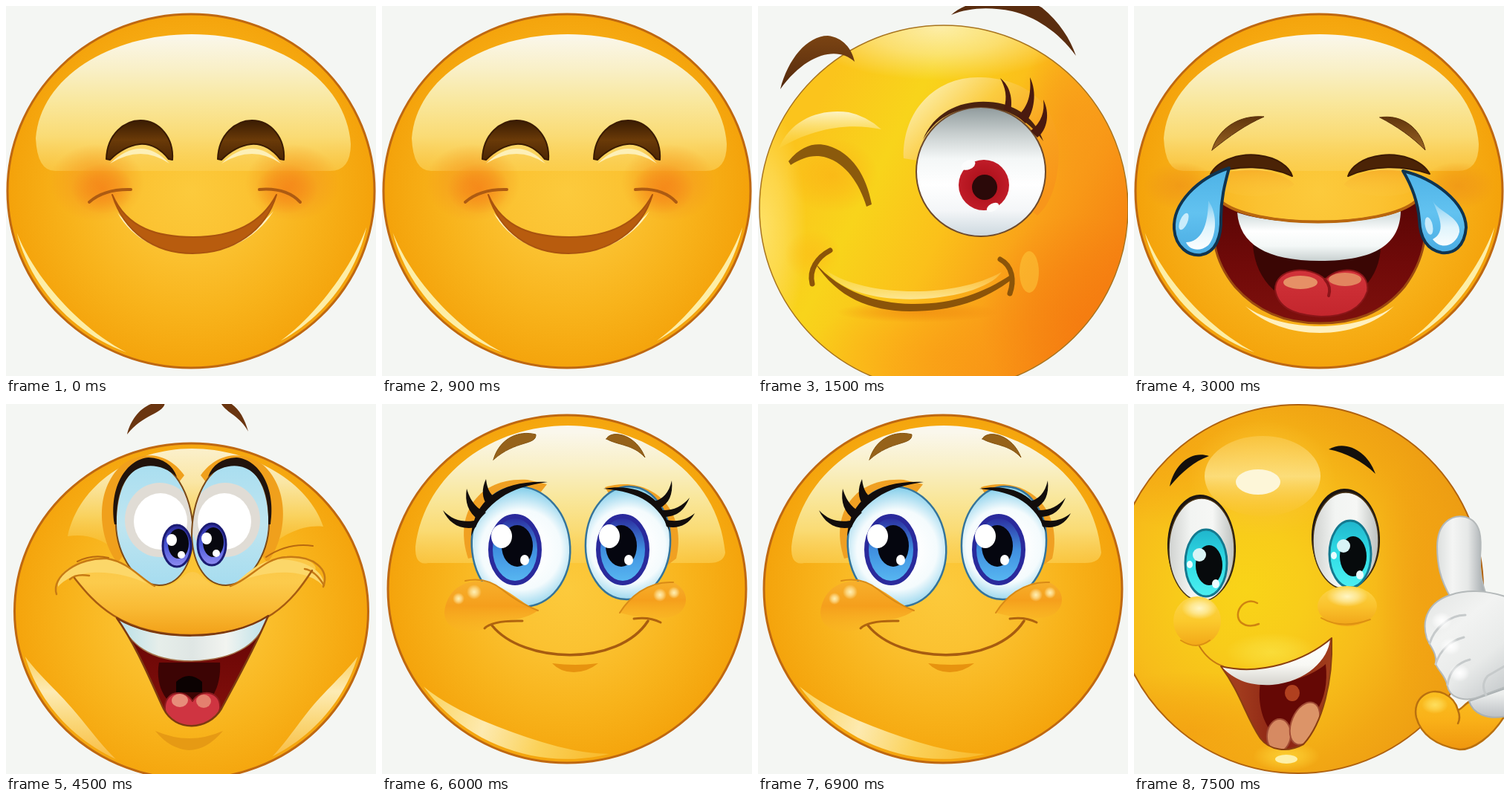
Animation, 498 px wide and 498 px high, one loop 9000 ms. Source, as an HTML page with a canvas:

```html
<!DOCTYPE html>
<html lang="en">
<head>
<meta charset="utf-8">
<title>Six smileys</title>
<style>
html, body { margin: 0; width: 100%; height: 100%; overflow: hidden; background: #f4f6f3; }
canvas { display: block; width: 498px; height: 498px; }
</style>
</head>
<body>
<canvas id="stage" width="498" height="498"></canvas>
<script>
const ctx = document.getElementById('stage').getContext('2d');
const HOLD = 1500;

function ramp(g, colors) {
  colors.forEach((c, i) => g.addColorStop(i / (colors.length - 1), c));
  return g;
}
const lin = (x0, y0, x1, y1, ...colors) => ramp(ctx.createLinearGradient(x0, y0, x1, y1), colors);
const rad = (x, y, r, ...colors) => ramp(ctx.createRadialGradient(x, y, 0, x, y, r), colors);

function paint(path, fill, line, width = 2) {
  if (fill) { ctx.fillStyle = fill; ctx.fill(path); }
  if (line) { ctx.strokeStyle = line; ctx.lineWidth = width; ctx.stroke(path); }
}
const shape = (d, fill, line, width) => paint(new Path2D(d), fill, line, width);
const stroke = (d, color, width) => shape(d, null, color, width);

function ovalPath(x, y, rx, ry, turn = 0) {
  const p = new Path2D();
  p.ellipse(x, y, rx, ry, turn, 0, Math.PI * 2);
  return p;
}
const oval = (x, y, rx, ry, fill, line, width, turn) => paint(ovalPath(x, y, rx, ry, turn), fill, line, width);

// Elliptical glow; rgb is "r,g,b"
function glow(x, y, rx, ry, rgb, alpha = 1) {
  ctx.save();
  ctx.translate(x, y);
  ctx.scale(rx, ry);
  oval(0, 0, 1, 1, rad(0, 0, 1, `rgba(${rgb},${alpha})`, `rgba(${rgb},${alpha * 0.6})`, `rgba(${rgb},0)`));
  ctx.restore();
}

function within(path, draw) {
  ctx.save();
  ctx.clip(path);
  draw();
  ctx.restore();
}

function mirrored(axis, draw) {
  draw();
  ctx.save();
  ctx.translate(2 * axis, 0);
  ctx.scale(-1, 1);
  draw();
  ctx.restore();
}

function ball(x, y, rx, ry) {
  oval(x, y, rx, ry, rad(x, y, 248, '#fcca3c', '#fbc231', '#f8b31b', '#f4a20a'), '#bf6811', 3);
}

// Crescent just inside the rim of a ball, between two angles in degrees
function rimLight(x, y, rx, ry, from, to, depth, fill) {
  const p = new Path2D();
  const steps = 24;
  for (let i = 0; i <= 2 * steps; i++) {
    const u = i <= steps ? i / steps : 2 - i / steps;
    const a = (from + (to - from) * u) * Math.PI / 180;
    const r = 0.978 - (i > steps ? depth * Math.sin(Math.PI * u) : 0);
    p.lineTo(x + rx * r * Math.cos(a), y + ry * r * Math.sin(a));
  }
  p.closePath();
  paint(p, fill);
}

const glossFill = bottom => lin(0, 38, 0, bottom, '#faf7ec', '#f9f0c8', '#f9e79c', '#fadb74', 'rgba(251,208,84,.65)');

function glossyBall() {
  ball(249, 249, 247, 238);
  shape('M40 178C46 96 140 38 250 38C362 38 458 98 464 186Q464 222 436 222H66Q42 222 40 178Z', glossFill(222));
  rimLight(249, 249, 247, 238, 166, 111, 0.036, '#fdeea6');
  rimLight(249, 249, 247, 238, 12, 60, 0.032, '#fdeea6');
}

function beaming() {
  glossyBall();
  mirrored(254, () => {
    glow(122, 238, 64, 52, '245,150,30', 0.8);
    glow(130, 246, 42, 34, '245,125,22', 0.65);
  });
  for (const dx of [0, 150]) {
    ctx.save();
    ctx.translate(dx, 0);
    shape('M140 212Q182 172 220 212Q182 186 140 212Z', '#fdf0b8');
    shape('M135 206C136 172 160 154 181 154C207 154 226 178 224 207L219 206C206 190 192 185 180 186C163 188 151 196 140 207Z',
      lin(0, 154, 0, 207, '#3a1c02', '#6a3a08', '#4c2604'), '#3a1b02', 2);
    ctx.restore();
  }
  shape('M150 278C190 352 314 352 360 276C318 328 190 330 150 278Z', '#fff2bf');
  shape('M143 254C163 300 205 311 252 311C302 311 342 296 364 254C350 302 306 333 251 333C200 333 159 305 143 254Z', '#b85c0e', '#a9530e', 2);
  stroke('M112 264Q132 246 168 247M341 247Q377 244 396 264', '#ad5b12', 4);
}

function winking() {
  const body = ovalPath(250, 272, 248, 246);
  paint(body, lin(50, 190, 455, 400, '#fbc41c', '#f8d41b', '#fbc01a', '#f99e18', '#f58312'));
  within(body, () => {
    glow(245, 30, 190, 70, '253,240,180', 0.9);
    glow(5, 300, 60, 170, '255,232,120', 0.8);
    glow(250, 470, 180, 90, '250,150,20', 0.5);
    glow(430, 420, 130, 140, '245,118,14', 0.5);
    glow(420, 150, 70, 110, '247,150,25', 0.6);
  });
  paint(body, null, '#a8741f', 1.5);

  // closed eye
  shape('M28 192C44 152 84 138 122 143Q146 148 166 166C120 156 70 166 28 192Z', lin(0, 140, 0, 190, '#fdf6cf', 'rgba(252,215,70,.3)'));
  glow(100, 228, 62, 50, '251,176,20', 0.65);
  shape('M41 209C60 186 78 184 94 188C126 197 146 228 153 267L146 270C136 238 118 212 92 204C75 199 60 204 44 214Z', '#8b5a0c');

  // open eye
  shape('M196 205C194 140 240 94 300 96C370 98 412 142 404 215C400 250 390 270 376 282L300 222Z',
    lin(240, 90, 390, 250, '#fdf0ae', '#fbcc40', '#f9a51e', '#f8961a'));
  oval(300, 223, 87, 87, lin(0, 136, 0, 310, '#8f9a9c', '#c6cdcd', '#f4f7f7', '#ffffff', '#f4f6f8', '#ccd8df'), '#6e4a2c', 2);
  shape('M222 180C240 134 290 122 330 132C358 140 376 158 384 182C362 150 330 136 300 136C264 137 238 152 222 180Z', '#4a220f');
  shape('M331 139C336 122 333 110 326 97C340 108 343 126 340 142Z', '#4a1a0f');
  shape('M349 148C364 136 368 118 366 96C376 116 372 142 360 158Z', '#4a1a0f');
  shape('M367 168C382 156 386 142 384 126C393 144 390 166 376 177Z', '#4a1a0f');
  oval(304, 241, 34, 34, rad(304, 241, 34, '#8f0f18', '#b3141f', '#c01c28'));
  oval(283, 214, 10, 6, '#fbfcfc', null, 0, -0.4);
  oval(316, 271, 9, 5, '#fbfcfc', null, 0, -0.5);
  oval(305, 244, 17, 17, '#2b0909');

  // eyebrows
  shape('M30 112C40 72 66 40 94 40C114 42 127 58 130 75C108 54 66 62 30 112Z', lin(0, 40, 0, 112, '#7b4413', '#53290d'));
  shape('M260 12C288 -14 352 -14 382 2C406 22 420 44 428 67C404 34 372 14 342 7C312 1 284 2 260 12Z', '#5a2d0f');

  // mouth
  glow(74, 335, 38, 34, '252,190,24', 0.7);
  oval(365, 358, 13, 28, 'rgba(253,200,60,.55)');
  shape('M92 356C140 390 260 396 328 358C300 400 130 414 92 356Z', lin(0, 352, 0, 404, 'rgba(253,224,110,.2)', '#fdf0b2'));
  glow(215, 412, 110, 14, '238,130,14', 0.6);
  shape('M76 345C112 386 160 400 206 401C262 402 304 386 340 362L343 367C306 396 262 411 204 411C150 410 108 394 76 345Z', '#8b5409');
  stroke('M73 374C68 355 80 338 97 329M326 341C343 350 345 370 339 387', '#8b5409', 7);
}

function laughing() {
  glossyBall();
  mirrored(249, () => {
    glow(62, 242, 50, 32, '240,150,22', 0.8);
    shape('M100 236C130 216 190 214 216 240C190 262 130 262 100 236Z', lin(0, 218, 0, 260, 'rgba(246,166,36,.7)', 'rgba(252,205,70,.1)'));
  });
  shape('M105 194C112 168 138 146 175 149C150 160 130 174 105 194Z', lin(0, 148, 0, 194, '#5f340c', '#9a6424'), '#5a310c', 1);
  shape('M331 150C360 145 386 164 392 194C374 176 354 162 331 150Z', lin(0, 148, 0, 194, '#5f340c', '#9a6424'), '#5a310c', 1);
  mirrored(250.5, () => shape('M103 226C114 206 144 198 168 201C193 204 209 216 213 229C180 214 140 214 103 226Z', '#4b2306', '#3c1a04', 2));

  shape('M150 404C200 440 300 440 350 404C300 452 200 452 150 404Z', '#fff0bd');
  const mouth = new Path2D('M116 262C158 300 338 300 380 262C404 296 388 346 364 378C334 414 296 427 250 427C204 427 166 412 136 378C108 344 98 300 116 262Z');
  paint(mouth, lin(0, 270, 0, 425, '#5c0605', '#700a09', '#7d100d'));
  within(mouth, () => {
    shape('M160 322H332C332 366 300 400 250 406C198 402 164 372 160 322Z', '#3a0604');
    shape('M190 382C190 352 236 348 257 368C280 346 318 354 314 384C306 408 284 418 252 418C218 416 194 408 190 382Z',
      lin(0, 355, 0, 418, '#d2333a', '#c3262d'), '#8a1518', 2);
    stroke('M257 368Q266 378 262 390', '#8c1419', 4);
    oval(224, 372, 23, 9, '#e69066');
    oval(284, 368, 22, 9, '#e2855f');
    shape('M139 278C190 296 310 296 359 276C358 320 326 343 250 343C178 343 142 320 139 278Z',
      lin(0, 283, 0, 343, '#d6e0e0', '#ffffff', '#f4f8f7', '#c8d0d0'));
  });
  paint(mouth, null, '#9c4a10', 3);
  stroke('M116 262C158 300 338 300 380 262', '#b8660f', 4);

  const blue = lin(0, 220, 0, 336, '#4db2e6', '#62c2f0', '#49abe2');
  shape('M128 218C85 232 52 266 54 300C56 325 74 337 90 335C110 332 118 310 117 285C117 260 122 240 128 218Z', blue, '#0f3450', 4);
  shape('M362 222C404 232 446 264 447 298C445 324 430 334 414 332C394 328 385 312 384 288C382 262 374 242 362 222Z', blue, '#0f3450', 4);
  const shine = lin(0, 265, 0, 330, 'rgba(255,255,255,.2)', '#dff4fc', '#ffffff');
  shape('M100 262C112 278 112 308 100 322C88 332 74 328 70 318C90 318 100 296 100 262Z', shine);
  shape('M402 262C408 276 440 284 438 304C434 322 414 330 402 314C420 304 412 286 402 262Z', shine);
  oval(67, 290, 5, 12, '#c9ecfb', null, 0, 0.4);
  oval(397, 296, 5, 12, '#c9ecfb', null, 0, -0.2);
}

function thrilled() {
  shape('M163 41C168 18 188 -6 214 -2C212 14 186 12 163 41Z', '#6a3510');
  shape('M326 37C320 14 306 -6 288 -4C294 12 314 14 326 37Z', '#6a3510');
  ball(249.5, 279, 238, 226);
  shape('M83 178C98 108 170 60 250 60C332 60 408 106 427 165C400 162 370 176 352 196L146 196C130 182 108 174 83 178Z',
    lin(0, 60, 0, 196, '#fbf0cc', '#fae6a4', '#f9d25e', 'rgba(249,190,50,.6)'));
  const light = lin(0, 345, 0, 470, '#fad46a', '#fdebb4', '#fad778', '#f9c04a');
  rimLight(249.5, 279, 238, 226, 164, 116, 0.09, light);
  rimLight(249.5, 279, 238, 226, 16, 62, 0.09, light);

  mirrored(251, () => {
    shape('M150 214C124 180 118 116 156 82C180 64 216 62 240 96L190 160Z', '#f0a01c');
    const eye = new Path2D('M148 152C150 110 166 82 194 80C232 80 252 132 252 178C250 218 232 244 206 244C170 242 146 196 148 152Z');
    paint(eye, lin(0, 80, 0, 244, '#a9def0', '#bfe5f0', '#a6dcef'));
    within(eye, () => {
      oval(207, 156, 47, 50, '#e0dcd5');
      oval(208, 158, 36, 38, '#ffffff');
    });
    paint(eye, null, '#7c4a18', 2);
    shape('M146 162C138 112 162 74 192 72C212 73 224 82 230 98C210 80 184 78 168 94C152 110 148 136 149 162Z', '#21130c');
  });
  for (const [x, y] of [[230, 191], [277, 189]]) {
    oval(x, y, 19, 28, lin(0, y - 28, 0, y + 28, '#2a2896', '#4a58d8', '#8f8cf2'), '#1c1c74', 3);
    oval(x + 2, y - 3, 14, 20, '#07070f');
    oval(x - 7, y - 8, 7, 8, '#ffffff');
    oval(x + 6, y + 12, 5, 5, '#ffffff');
  }

  // cheeks and upper lip
  shape('M92 234C78 228 84 210 136 207C166 212 182 236 200 245C230 252 236 226 251 226C266 226 272 252 302 245C330 236 346 206 378 205C418 206 424 226 410 226C386 264 350 312 250 311C152 311 112 262 92 234Z',
    lin(0, 204, 0, 311, '#fbc644', '#fccb4c', '#f9ba34', '#f2a018'));
  mirrored(249, () => shape('M70 246C68 224 98 208 136 209C160 213 176 230 190 242C160 226 96 216 70 246Z', '#fcd769'));
  stroke('M68 256C60 232 98 206 136 208C166 213 182 236 200 245M302 245C330 236 346 207 378 206C414 204 436 222 427 246', '#c77a14', 2.5);
  stroke('M96 212Q116 202 138 207M350 206Q380 186 413 191', '#b8690f', 2);
  stroke('M86 236Q94 228 112 231M402 222Q416 224 428 244', '#c77a14', 2.5);
  stroke('M92 234C116 264 152 311 250 311C350 311 386 264 412 224', '#a85c10', 2.5);

  const mouth = new Path2D('M149 288C200 320 300 320 353 285C332 334 306 380 290 410C272 440 228 442 212 410C196 376 176 326 149 288Z');
  paint(mouth, lin(0, 320, 0, 430, '#6c0706', '#84100c'));
  within(mouth, () => {
    shape('M206 348H288C290 380 276 410 246 414C216 410 200 380 206 348Z', '#3c0404');
    shape('M229 388V374Q246 358 264 374V388Z', '#0b0202');
    shape('M214 412C212 386 240 382 251 400C262 382 290 386 288 410C282 440 222 444 214 412Z', '#cf3441', '#8c1a1f', 2);
    oval(234, 399, 11, 9, '#e78d7a');
    oval(266, 400, 10, 9, '#e4806f');
    shape('M149 288C200 320 300 320 353 285C342 320 314 344 250 346C192 346 168 324 149 288Z',
      lin(160, 0, 342, 0, '#bfe2e8', '#e6eeea', '#dfe6e4', '#f2f4f0', '#c4e4ea'), '#a3724a', 1.5);
  });
  paint(mouth, null, '#7d3a10', 2.5);
  shape('M201 440Q247 460 292 440Q270 466 246 466Q220 464 201 440Z', '#e69a14');
}

function sweet() {
  ball(249, 249, 241, 234);
  shape('M45 192C58 92 150 29 250 29C350 29 452 92 462 200Q460 214 440 214H62Q44 218 45 192Z', glossFill(214));
  rimLight(249, 249, 241, 234, 145, 76, 0.1, lin(70, 390, 290, 470, '#fbd768', '#fdeab0', '#fbd25a', '#f8bc30'));
  shape('M116 208C96 150 128 98 196 102L222 108L150 200Z', '#f0a022');
  shape('M300 112C360 94 412 140 396 208L372 226Z', '#f0a022');

  const eye = (x, y, rx, ry, turn) => {
    oval(x, y, rx, ry, rad(x, y + 4, ry, '#ffffff', '#ffffff', '#f4fbfd', '#8ed2ec'), '#35749a', 2.5, turn);
  };
  eye(187, 192, 66, 81, -0.12);
  eye(331, 187, 57, 76, 0.06);
  for (const [x, px] of [[179, 182], [324, 322]]) {
    oval(x, 196, 33, 45, lin(0, 151, 0, 241, '#2a2a9c', '#3f8fe0', '#59b9f2'), '#2a2a9c', 6);
    oval(px, 191, 21, 28, '#05060f');
    oval(x - 18, 178, 14, 16, '#ffffff');
    oval(px + 10, 210, 6, 7, '#ffffff');
  }

  // lids and lashes
  const ink = '#120d0c';
  shape('M120 178C124 126 164 102 223 105C172 112 140 130 120 178Z', ink);
  shape('M126 166C104 170 90 160 82 143C96 158 112 160 130 156Z', ink);
  shape('M130 156C116 146 111 132 114 114C120 134 130 142 140 146Z', ink);
  shape('M142 137C134 126 134 114 140 101C142 118 148 124 156 128Z', ink);
  shape('M298 114C346 106 382 126 387 172C374 136 348 118 298 114Z', ink);
  shape('M366 131C378 128 386 120 390 103C392 122 386 134 374 140Z', ink);
  shape('M374 143C392 144 404 138 414 126C406 146 394 152 378 152Z', ink);
  shape('M380 155C396 160 410 156 421 147C412 164 398 168 383 165Z', ink);
  shape('M150 75C158 46 184 35 207 41C208 56 180 48 150 75Z', '#96621a', '#83520f', 1);
  shape('M302 47C308 34 342 40 354 72C338 54 318 56 302 47Z', '#96621a', '#83520f', 1);

  // cheeks
  shape('M84 280C88 246 116 234 144 240C172 250 190 270 210 278C196 288 176 292 160 292C146 296 140 306 118 306C94 306 84 294 84 280Z',
    lin(0, 238, 0, 306, '#f7b02c', '#f59f1c', 'rgba(249,180,36,.4)'));
  shape('M320 281C336 256 366 236 392 240C414 250 414 274 396 284C378 292 346 288 320 281Z',
    lin(0, 238, 0, 290, '#f7b02c', '#f59f1c', 'rgba(249,180,36,.6)'));
  stroke('M112 238Q140 232 162 250T210 278M320 281C332 262 356 238 392 240', '#d98a16', 2);
  for (const [x, y, r] of [[103, 262, 8], [124, 253, 10], [374, 257, 9], [393, 254, 8]]) glow(x, y, r, r, '255,240,180');

  stroke('M148 298C190 350 318 354 358 292', '#a75c10', 3.5);
  stroke('M138 302Q148 291 189 292M339 289Q360 286 375 294', '#b0640f', 3);
  shape('M229 349Q260 353 291 349Q276 361 258 361Q240 361 229 349Z', '#e7930f');
}

function approving() {
  const body = ovalPath(221, 249, 249, 248);
  paint(body, rad(150, 250, 330, '#f9d418', '#f8cc1a', '#f7bd1a', '#f2a814', '#ec9a12'));
  within(body, () => {
    glow(60, 60, 120, 110, '245,160,16', 0.6);
    glow(80, 440, 170, 80, '243,156,16', 0.6);
    glow(385, 240, 60, 180, '240,152,18', 0.4);
    glow(172, 100, 100, 78, '251,196,50', 0.9);
    oval(173, 97, 78, 54, lin(0, 43, 0, 152, 'rgba(252,214,110,.4)', 'rgba(252,224,130,.9)', 'rgba(250,196,50,.2)'));
    glow(185, 334, 62, 26, '250,222,60', 0.9);
  });
  paint(body, null, '#b0620f', 2);
  oval(167, 105, 30, 17, '#fdf6d8');

  shape('M48 111C54 82 76 62 101 70C80 78 66 90 48 111Z', '#14100c');
  shape('M262 61C284 48 314 62 325 94C306 76 286 66 262 61Z', '#14100c');

  for (const [x, y, ry] of [[91, 196, 71], [285, 184, 67]]) {
    oval(x, y - 3, 46, ry, '#1d1611', null, 0, -0.04);
    oval(x, y, 44, ry - 2, lin(x - 44, 0, x + 44, 0, '#d0d2d0', '#f2f4f2', '#f6f7f5', '#bcc0be'), '#4a3518', 1.5);
    oval(x + 6, y + 18, 28, 45, lin(0, y - 28, 0, y + 62, '#1fb4cc', '#30dde6', '#4ceff0'), '#14798f', 3);
    oval(x + 10, y + 21, 18, 27, '#070a0c');
    oval(x - 3, y + 7, 9, 9, '#d8f4f6');
    oval(x + 19, y + 46, 5, 6, '#eafcff');
    oval(x - 16, y + 20, 4, 5, '#eafcff');
  }
  oval(85, 292, 32, 33, lin(0, 260, 0, 325, '#fcd548', '#fbc92c', '#f2a818'));
  oval(287, 272, 40, 27, lin(0, 246, 0, 299, '#fcd548', '#fac22c', '#f0a418'));
  glow(88, 275, 24, 15, '255,246,196');
  glow(287, 259, 28, 14, '255,246,196');
  stroke('M63 318Q84 332 102 318M252 288Q280 304 318 290', '#dc9012', 2);
  stroke('M166 268C148 258 132 282 144 294Q154 302 168 296', '#cf8410', 2.5);
  stroke('M88 326Q100 346 120 353', '#c77a10', 2);

  // mouth
  glow(205, 474, 45, 20, '252,206,50');
  oval(205, 478, 15, 6, '#fdf0a8');
  const mouth = new Path2D('M117 353C170 366 230 346 266 315C268 372 254 430 228 458C206 470 182 466 170 450C150 420 144 390 117 353Z');
  paint(mouth, lin(140, 0, 262, 0, '#a23c1e', '#8a2212', '#a03c1c'));
  within(mouth, () => {
    shape('M170 376C200 380 240 366 258 350C264 400 240 440 190 446C172 430 166 400 170 376Z', '#650805');
    oval(213, 389, 10, 11, '#b0401f');
    oval(195, 446, 16, 22, '#d68a62', '#a04a34', 2, 0.1);
    oval(230, 430, 18, 30, '#dc9468', '#a04a34', 2, 0.4);
    shape('M117 353C170 366 230 346 264 316C262 344 232 374 186 378C150 380 132 368 117 353Z',
      lin(0, 325, 0, 378, '#ffffff', '#f8f8f4', '#d4d2cc'));
  });
  paint(mouth, null, '#8a3f10', 2);

  // arm, cuff, glove
  shape('M380 422C374 396 398 380 418 390C430 396 434 404 436 412C442 410 446 402 456 398L500 418C482 448 456 466 438 465C406 460 386 444 380 422Z',
    lin(0, 388, 0, 465, '#fbbf20', '#f9b018', '#ef960e'), '#b9700f', 2.5);
  stroke('M436 412Q440 422 436 430', '#b9700f', 2.5);
  glow(405, 405, 18, 12, '255,232,110', 0.8);
  shape('M451 400L502 382V420C474 426 456 416 451 400Z', lin(0, 390, 0, 424, '#eceeed', '#b8bcc0'), '#aab0b2', 2);
  shape('M408 192C408 160 428 148 446 152C468 158 468 182 466 206C465 230 470 244 473 254L426 260C412 236 408 216 408 192Z',
    lin(408, 0, 470, 0, '#dcdfde', '#f4f5f4', '#e6e8e7', '#a9afb2'), '#b4b9ba', 2);
  shape('M426 257C398 266 386 288 394 315C398 326 408 334 406 350C410 360 420 366 422 380C426 398 450 402 470 392L502 380V260C474 250 446 250 426 257Z',
    lin(395, 260, 498, 390, '#e4e6e5', '#f2f3f2', '#e8eae9', '#c6cacc'), '#b4b9ba', 2);
  stroke('M398 322C404 302 424 284 446 284M406 350C412 330 428 318 444 314M422 378C424 360 436 348 452 344M474 392Q466 378 476 366L500 352', '#c6cacb', 3);
  for (const [x, y] of [[414, 292], [426, 326], [438, 362]]) glow(x, y, 14, 12, '255,255,255');
}

const faces = [beaming, winking, laughing, thrilled, sweet, approving];
const start = performance.now();

function frame() {
  const t = Math.max(0, performance.now() - start);
  ctx.lineCap = 'round';
  ctx.lineJoin = 'round';
  ctx.fillStyle = '#f4f6f3';
  ctx.fillRect(0, 0, 498, 498);
  faces[Math.floor(t / HOLD) % faces.length]();
  requestAnimationFrame(frame);
}
frame();
</script>
</body>
</html>
```
